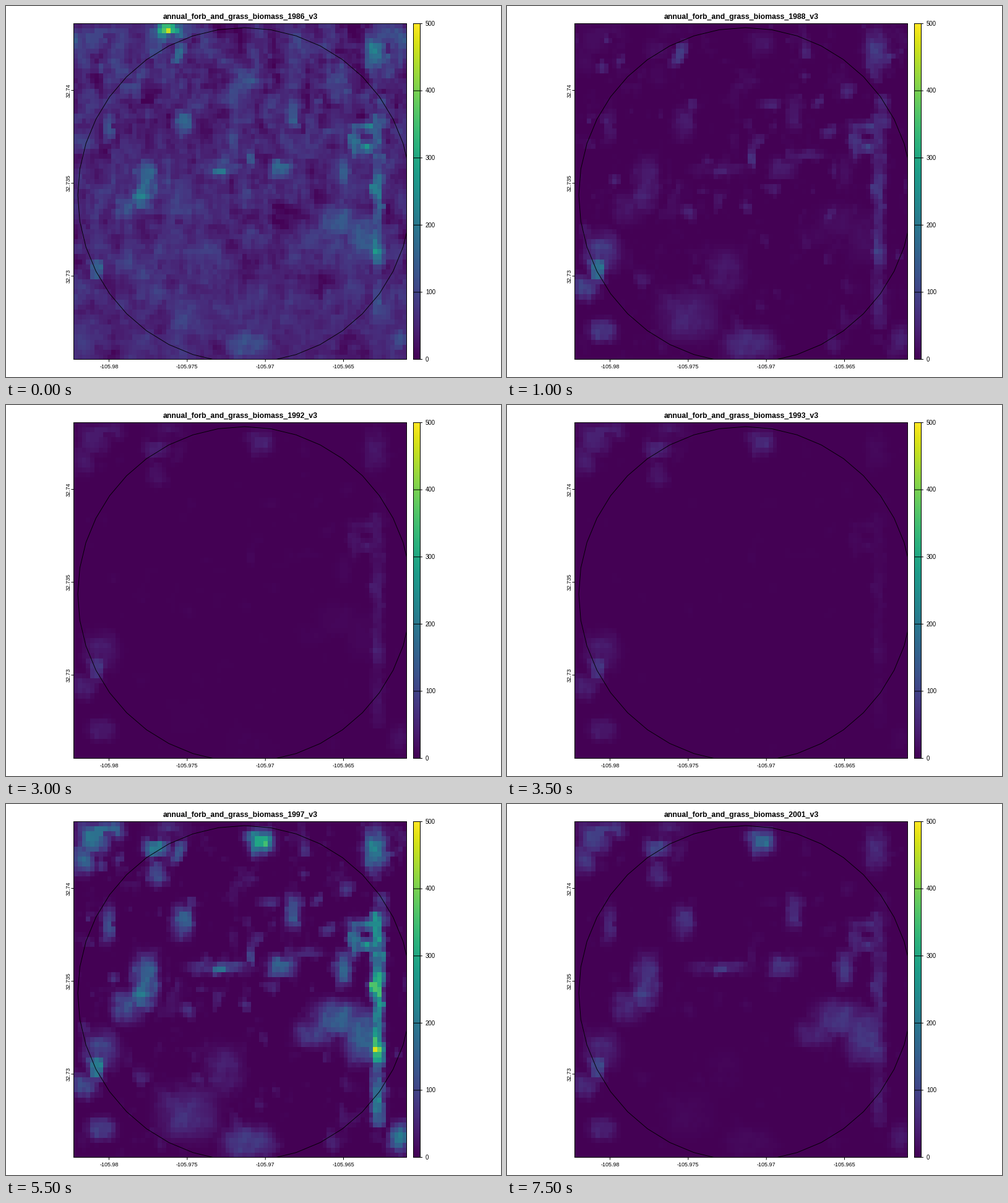
A matplotlib script for the animation above (8000 ms loop, 800x600 px).

```python
import numpy as np
import matplotlib.pyplot as plt
from matplotlib.animation import FuncAnimation

W, H, DPI = 800, 600, 100
PX = 72 / DPI
L, R, T, B = 109.5, 647.5, 28.5, 571.5
COLS, ROWS = 79, 67
VMAX = 500

rng = np.random.default_rng(32)
X, Y = np.meshgrid(L + (np.arange(COLS) + 0.5) * (R - L) / COLS,
                   T + (np.arange(ROWS) + 0.5) * (B - T) / ROWS)
SOUTH = (Y - T) / (B - T)


def grain(passes):
    """Unit-variance noise, smoother with more passes."""
    n = rng.normal(size=(ROWS, COLS))
    for _ in range(passes):
        n = (2 * n + sum(np.roll(n, s, a) for s in (-1, 1) for a in (0, 1))) / 6
    return (n - n.mean()) / n.std()


DX, DY = 2 * grain(1), 2 * grain(1)
MOTTLE = 1 + 0.13 * grain(1)
TEXTURE = (0.6 * grain(1) + 0.7 * grain(8)) * (1.25 - 0.6 * SOUTH)
TUFTS = np.clip(grain(4) - 1, 0, None) * (1.3 - SOUTH)


def patches(*spots):
    """Rounded patches (x, y, rx, ry, peak) with ragged edges."""
    layers = [v * np.exp(-np.abs((X + DX - x) / rx) ** 3 - np.abs((Y + DY - y) / ry) ** 3)
              for x, y, rx, ry, v in spots]
    return MOTTLE * np.max(layers, axis=0)


# Places where forage keeps coming back, at their lushest.
spring = patches((262, 42, 17, 10, 480), (262, 42, 36, 18, 210))
corner = patches((143, 52, 24, 26, 215), (168, 40, 22, 14, 180), (124, 90, 18, 24, 150),
                 (243, 72, 22, 13, 210), (244, 112, 15, 18, 150))
tank = patches((411, 60, 22, 21, 250), (414, 62, 12, 11, 400))
paddock = patches((595, 72, 17, 32, 235), (580, 196, 28, 9, 240),
                  (562, 220, 9, 28, 220), (585, 228, 20, 9, 240))
wash = patches((637, 540, 15, 24, 250),
               *[(600, y, 11, 14, (340 + 120 * np.cos((y - 212) / 14.2)) * (0.65 if y > 420 else 1))
                 for y in range(184, 520, 14)])
fan = patches((535, 348, 36, 28, 165), (578, 375, 28, 38, 190),
              (500, 372, 32, 20, 100), (545, 265, 12, 26, 175))
slope = patches((227, 282, 20, 38, 195), (222, 312, 19, 17, 255), (195, 328, 24, 24, 150),
                (165, 192, 11, 28, 160), (286, 192, 16, 24, 190), (345, 265, 45, 10, 140),
                (345, 268, 11, 8, 300), (445, 263, 22, 16, 215), (462, 175, 13, 28, 180))
southwest = patches((147, 424, 12, 20, 340), (155, 398, 26, 28, 140),
                    (125, 455, 18, 19, 185), (155, 525, 22, 16, 115))
flats = patches((292, 500, 46, 40, 88), (352, 430, 28, 38, 62), (390, 546, 38, 25, 125))

# Key years and the strength of each layer in them; other years are interpolated.
KEYS = (1986, 1988, 1990, 1993, 1996, 1999, 2001)
BASE = (54, -1, -5, -10, -6, -7, -9)
ROUGH = (23, 5, 3, 1, 14, 4, 2)
STRENGTH = [
    (TUFTS, (75, 38, 9, 3, 75, 16, 9)),
    (spring, (1, .03, .03, .07, .2, .08, .1)),
    (corner, (.5, .08, .08, .22, 1, .7, .45)),
    (tank, (.15, .08, .06, .17, 1, .8, .5)),
    (paddock, (.9, .36, .28, .05, 1, .75, .25)),
    (wash, (.45, .17, .18, .03, 1, .3, .13)),
    (fan, (.8, .1, .15, 0, 1, .65, .45)),
    (slope, (.8, .18, .03, 0, 1, .25, .35)),
    (southwest, (.5, .6, .25, .25, 1, .05, .35)),
    (flats, (1, .5, .1, 0, 1, .14, .1)),
]


def biomass(year):
    def at(values):
        return np.interp(year, KEYS, values)

    f = at(BASE) + at(ROUGH) * TEXTURE
    for layer, values in STRENGTH:
        f = np.maximum(f, at(values) * layer)
    return np.clip(f, 0, VMAX)


years = range(KEYS[0], KEYS[-1] + 1)
maps = [biomass(y) for y in years]

plt.rcParams["font.family"] = "Liberation Sans"
fig = plt.figure(figsize=(W / DPI, H / DPI), dpi=DPI, facecolor="white")
ax = fig.add_axes([0, 0, 1, 1])
ax.axis("off")


def raster(data, x0, x1):
    return ax.imshow(data, extent=(x0 - 0.5, x1 + 0.5, B + 0.5, T - 0.5), cmap="viridis",
                     vmin=0, vmax=VMAX, interpolation="nearest", aspect="auto")


def line(xs, ys, width=1):
    return ax.plot(xs, ys, color="black", lw=width * PX, snap=False,
                   solid_joinstyle="miter", solid_capstyle="butt")[0]


def frame(x0, x1):
    line([x0, x1, x1, x0, x0], [T, T, B, B, T])


def label(x, y, s, size, ha="center", **kw):
    return ax.text(x, y, s, fontsize=size * PX, ha=ha, va="baseline", color="black", **kw)


image = raster(maps[0], L, R)
raster(np.linspace(VMAX, 0, 256)[:, None], 658.5, 669.5)

# Forty-sided buffer outline, cut at the map edge.
a = np.linspace(0, 2 * np.pi, 41)
ring = line(385.5 + 269.5 * np.cos(a), 306 + 271 * np.sin(a), 0.9)
ring.set_clip_path(plt.Rectangle((L, T), R - L, B - T, transform=ax.transData))

frame(L, R)
frame(658.5, 669.5)

for i, lon in enumerate(("-105.98", "-105.975", "-105.97", "-105.965")):
    x = 166.5 + 126.33 * i
    line([x, x], [B, B + 4])
    label(x, 586.3, lon, 9)
for i, lat in enumerate(("32.74", "32.735", "32.73")):
    y = 136.5 + 150.2 * i
    line([L - 4, L], [y, y])
    label(104, y, lat, 9, rotation=90, rotation_mode="anchor")
for v in range(0, VMAX + 1, 100):
    y = B - v * (B - T) / VMAX
    line([658.5, 673], [y, y])
    label(678, y + 3.2, str(v), 9.6, ha="left")

title = label(378.3, 21.3, "", 12.2, weight="bold")
ax.set_xlim(0, W)
ax.set_ylim(H, 0)


def update(i):
    image.set_data(maps[i])
    title.set_text(f"annual_forb_and_grass_biomass_{years[i]}_v3")
    return image, title


anim = FuncAnimation(fig, update, frames=len(years), interval=500,
                     repeat=True, repeat_delay=0, blit=False)
plt.show()
```
